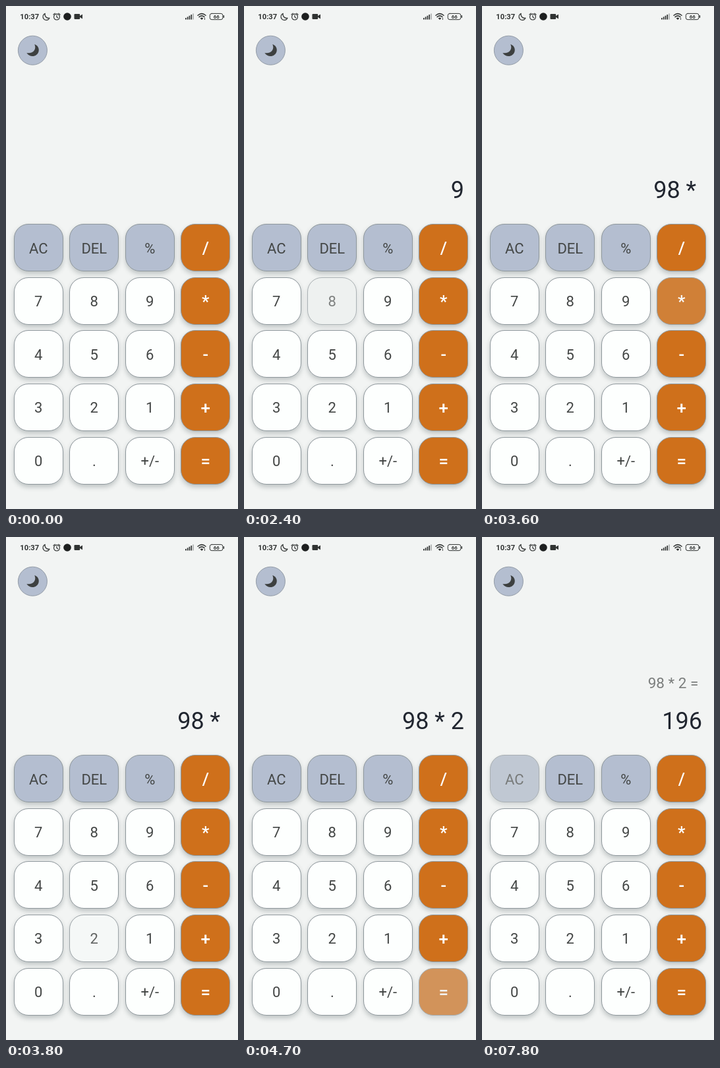
These frames come from a looping animation (352 by 762 pixels, 8 s). An HTML page:

```html
<!DOCTYPE html>
<html lang="en">
<head>
<meta charset="utf-8">
<title>Calculator</title>
<style>
  html, body { margin: 0; width: 100%; height: 100%; overflow: hidden; background: #f2f4f3; }
  body { position: relative; font-family: Roboto, "Open Sans", sans-serif; }
  svg { position: absolute; left: 0; top: 0; }
  .line { position: absolute; right: 18px; white-space: pre; text-align: right; }
  #history { top: 206px; font-size: 22.5px; line-height: 30px; color: #7b7e7d; }
  #value { top: 257px; font-size: 36px; line-height: 44px; color: #212630; }
  #history, #value { left: 0; width: 334px; }
  .key {
    --o: 1;
    position: absolute; width: 75px; height: 72px; border-radius: 22px;
    background: #d9dcdb;
    box-shadow: 0 4px 7px rgba(40, 55, 60, calc(.25 * var(--o)));
  }
  .face {
    position: absolute; inset: 0; box-sizing: border-box; padding-top: 2px;
    display: flex; align-items: center; justify-content: center;
    border: 1px solid #8e979c; border-radius: 22px;
    font-size: 22px; color: #434645; background: #fdfffe;
    opacity: var(--o);
  }
  .tool .face { background: #b4bed0; }
  .op .face { background: #cf701b; color: #fff; font-size: 26px; font-weight: 500; }
</style>
</head>
<body>
<svg width="352" height="100" viewBox="0 0 352 100" font-family="Roboto, sans-serif">
  <g fill="#303332">
    <text x="21.3" y="20" font-size="11.2" font-weight="600">10:37</text>
    <circle cx="93" cy="16" r="5.8" fill="#1d1f1f"/>
    <rect x="103.5" y="12" width="8.7" height="8" rx="1.2"/>
    <path d="M112 15.2L116 12.6V19.4L112 16.8z"/>
    <rect x="272" y="18" width="1.7" height="2.5"/>
    <rect x="274.8" y="16.4" width="1.7" height="4.1"/>
    <rect x="277.6" y="14.7" width="1.7" height="5.8"/>
    <rect x="280.4" y="13" width="1.7" height="7.5"/>
    <rect x="283.2" y="11.4" width="1.7" height="9.1" opacity=".35"/>
    <path d="M297 21L294.6 18.4Q297 16.6 299.4 18.4z"/>
    <rect x="329.6" y="14" width="1.5" height="4" rx=".7"/>
    <text x="319.2" y="18.9" font-size="7.8" font-weight="600" text-anchor="middle">66</text>
  </g>
  <g fill="none" stroke="#303332" stroke-width="1.2" stroke-linecap="round" stroke-linejoin="round">
    <path d="M59.2 11.4A5.2 5.2 0 1 0 66 18.2A5.6 5.6 0 0 1 59.2 11.4z"/>
    <circle cx="77" cy="16.6" r="4.4"/>
    <path d="M77 14V16.8L78.8 18M72 13L74.3 11.1M82 13L79.7 11.1"/>
    <path d="M291 14.2Q297 9 303 14.2M293 16.6Q297 13.2 301 16.6" stroke-width="1.5"/>
    <path d="M301.5 18.5V20.5" stroke-width=".9"/>
    <rect x="309.3" y="11.4" width="19.6" height="9.2" rx="2.8" stroke-width="1"/>
  </g>
  <circle cx="40.4" cy="67.2" r="22" fill="#b4bed0" stroke="#929ba6"/>
  <path d="M43.3 58C48.2 59.6 50.6 64 49.6 68.6C47.8 77.2 36.3 79 31.3 71C41 72.6 46.8 66 43.3 58z" fill="#3d4040"/>
</svg>
<div id="history" class="line"></div>
<div id="value" class="line"></div>
<script>
const LOOP = 8000;
const rows = ['AC DEL % /', '7 8 9 *', '4 5 6 -', '3 2 1 +', '0 . +/- ='];

// Key opacity, held from each time until the next
const presses = {
  '9': [[2000, .6], [2200, .75], [2300, .9], [2400, 1]],
  '8': [[2300, .8], [2400, .6], [2500, .8], [2600, 1]],
  '*': [[3300, .68], [3500, .72], [3600, .85], [3700, .95], [3800, 1]],
  '2': [[3800, .8], [3900, .6], [4000, .7], [4100, .87], [4200, 1]],
  '=': [[4700, .67], [4900, .75], [5000, .9], [5100, 1]],
  'AC': [[7800, .65]]
};
const values = [[2200, '9'], [2500, '98'], [3500, '98 * '], [4000, '98 * 2'], [4900, '196']];
const histories = [[4900, '98 * 2 = ']];

const keys = {};
rows.forEach((row, r) => row.split(' ').forEach((label, c) => {
  const key = document.createElement('div');
  const face = document.createElement('div');
  key.className = 'key ' + (c === 3 ? 'op' : r === 0 ? 'tool' : '');
  key.style.left = 11.8 + c * 84.5 + 'px';
  key.style.top = 330 + r * 80.65 + 'px';
  face.className = 'face';
  face.textContent = label;
  key.append(face);
  document.body.append(key);
  keys[label] = key;
}));

const held = (steps, t, start) =>
  steps.reduce((now, [at, next]) => t >= at ? next : now, start);

const show = (id, text) => {
  const line = document.getElementById(id);
  if (line.textContent !== text) line.textContent = text;
};

function draw() {
  const t = performance.now() % LOOP;
  for (const label in presses) {
    keys[label].style.setProperty('--o', held(presses[label], t, 1));
  }
  show('value', held(values, t, ''));
  show('history', held(histories, t, ''));
  requestAnimationFrame(draw);
}
draw();
</script>
</body>
</html>
```
